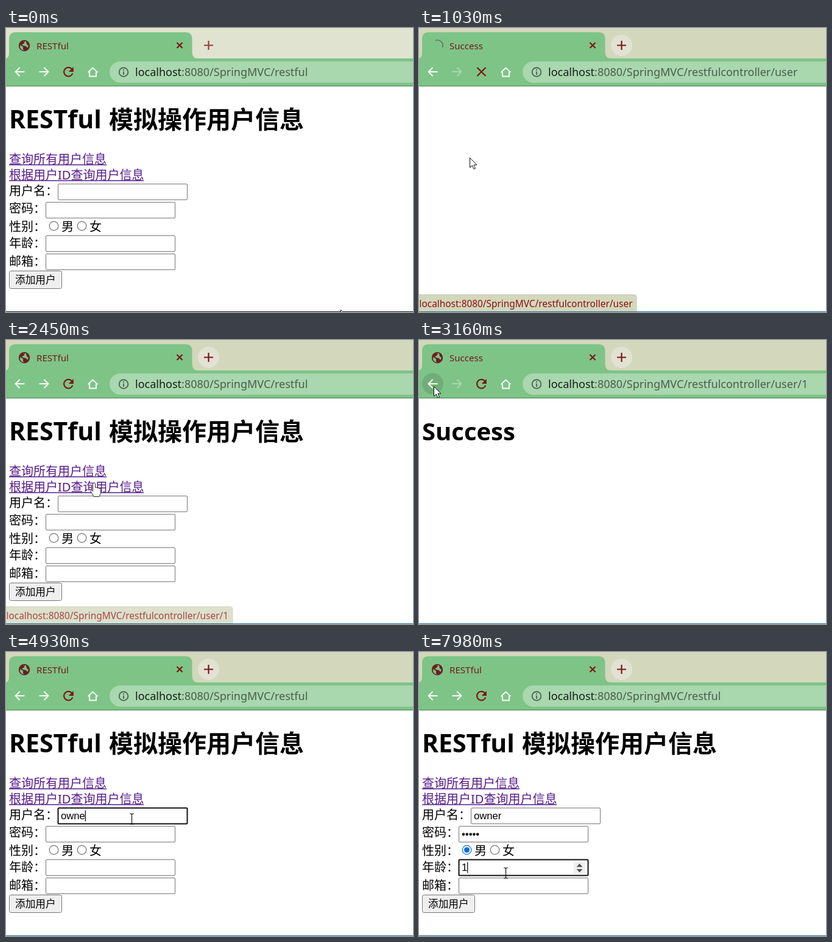
An HTML page for the animation above (8000 ms loop, 668 by 467 pixels).

```html
<!DOCTYPE html>
<html lang="zh-CN">
<head>
<meta charset="utf-8">
<title>RESTful</title>
<style>
  html, body { margin: 0; width: 100%; height: 100%; overflow: hidden; background: #fff; }
  svg { display: block; font-family: 'Noto Sans', 'Noto Sans CJK SC', 'Noto Sans CJK', sans-serif; }
  text { white-space: pre; }
  .line { fill: none; stroke-width: 1.9; }
  .white { stroke: #fbfff8; }
  .red { stroke: #7d1416; stroke-width: 2.2; }
  .tab { font-size: 15.1px; fill: #761a1c; }
  .url { font-size: 18px; fill: #4a5e4e; }
  .status { font-size: 15.4px; fill: #8e0d0f; }
  .head { font-size: 40px; font-weight: 700; }
  .body { font-size: 20px; font-weight: 350; }
  .link { fill: #551a8b; }
  .link + path { stroke: #551a8b; stroke-width: 1.4; }
  .field { fill: #fff; stroke: #767676; }
  .field.focus { stroke: #101010; stroke-width: 2; }
  .typed { font: 16.67px 'Liberation Sans', sans-serif; }
  .radio { fill: #fff; stroke: #767676; stroke-width: 1.2; }
  #spin { transform-origin: 30px 29px; }
</style>
</head>
<body>
<svg width="668" height="467" viewBox="0 0 668 467">
  <rect width="668" height="467" fill="#fff"/>

  <rect id="strip" width="668" height="51"/>
  <path d="M0 50Q5 49 5 41V18Q5 7 16 7H294.500Q305.500 7 305.500 18V40Q305.500 50 315.500 50H668V95H0Z" fill="#7ec487"/>
  <path d="M0 95.500H668" stroke="#47804f"/>
  <g id="globe">
    <circle cx="30" cy="29" r="9.200" fill="#6b1d20"/>
    <path d="M23 28L28 31V35L30 37Q22 36 23 28ZM28 22L31 23L29 26L26 27L28 29L33 30L35 33L37 29L34 27L33 22Z" fill="#7ec487"/>
  </g>
  <path id="spin" class="line" d="M27 20.500A9 9 0 0 1 38.500 32" stroke="#667d69"/>
  <text class="tab" id="title" x="50" y="35"></text>
  <path class="line red" d="M280.500 24L289.500 33M289.500 24L280.500 33"/>
  <circle id="plusDisc" cx="332.500" cy="28.500" r="17.500" fill="#e1e2d2"/>
  <path id="plus" class="line red" d="M325 28.500H340M332.500 21V36"/>

  <circle id="hover" cx="22.500" cy="72" r="17.500" fill="#70ad78"/>
  <path class="line white" d="M30.500 72H16M22.500 65L15.500 72L22.500 79"/>
  <path id="forward" class="line white" d="M54.500 72H69M62.500 65L69.500 72L62.500 79"/>
  <g id="reload">
    <path class="line red" d="M108 67.500A7.300 7.300 0 1 0 109.300 74.500"/>
    <path d="M110.800 64V72H102.800Z" fill="#7d1416"/>
  </g>
  <path id="stop" class="line red" d="M95.500 65L109.500 79M109.500 65L95.500 79"/>
  <path class="line white" d="M134.500 73L142.500 65.500L150.500 73M137 71V79.500H148V71"/>
  <path d="M668 55H187.500A17.500 17.500 0 0 0 187.500 90H668Z" fill="#a9d7ae"/>
  <circle class="line" cx="193" cy="72.500" r="7.300" stroke="#526457"/>
  <path class="line" d="M193 71.500V77M193 68V70" stroke="#526457"/>
  <text class="url" x="212" y="79"><tspan fill="#17201a">localhost</tspan><tspan id="path"></tspan></text>

  <text class="head" id="success" x="5" y="165">Success</text>
  <g id="form">
    <text class="head" x="5" y="165" style="font-size:41px">RESTful</text>
    <text class="head" x="169" y="165">模拟操作用户信息</text>
    <text class="body link" x="5" y="223">查询所有用户信息</text><path d="M5 225H165"/>
    <text class="body link" x="5" y="249">根据用户ID查询用户信息</text><path d="M5 251H226"/>
    <g id="rows"></g>
    <circle class="radio" id="male" cx="78.500" cy="325.500" r="7.300"/>
    <circle id="dot" cx="78.500" cy="325.500" r="4.500" fill="#0b6fde"/>
    <circle class="radio" cx="124.500" cy="325.500" r="7.300"/>
    <text class="body" x="5" y="334">性别：</text>
    <text class="body" x="91" y="334">男</text>
    <text class="body" x="137" y="334">女</text>
    <rect x="5.500" y="399.500" width="86" height="29" rx="3" fill="#efefef" stroke="#767676"/>
    <text x="15" y="420" font-size="16.670" font-weight="350">添加用户</text>
    <g id="stepper">
      <rect x="254" y="345" width="19" height="20" fill="#efefef"/>
      <path d="M258.500 353.500L263.500 348L268.500 353.500ZM258.500 357L263.500 362.500L268.500 357Z" fill="#505050"/>
    </g>
    <path id="caret" d="M0 -9V9" stroke="#000" stroke-width="1.200"/>
  </g>

  <g id="status">
    <path id="bubble" fill="#d3d7bc" stroke="#c8ccb2"/>
    <text class="status" id="statusText" x="0.500" y="459"></text>
  </g>
  <path id="edge" d="M0 466.500H668"/>

  <g id="cursor" stroke-linejoin="round">
    <path id="arrow" d="M0 0V16L3.800 12.500L6.500 18.500L9 17.400L6.400 11.600H11.500Z" fill="#fff" stroke="#111"/>
    <path id="hand" d="M-2 13V1.500Q0 -1 2 1.500V8Q4 6.500 5.500 9Q7.500 7.500 9 10Q11 9.500 11 12V17Q10 20 8.500 23H-0.500Q-2 19 -6 14Q-5.500 11 -2 14Z" fill="#fff" stroke="#3c1c22"/>
    <path id="beam" d="M-3.500 -8.500H-1L0 -7.500L1 -8.500H3.500M0 -7.500V7.500M-3.500 8.500H-1L0 7.500L1 8.500H3.500" fill="none" stroke="#111" stroke-width="1.200"/>
  </g>
</svg>
<script>
const LOOP = 8000;
const $ = id => document.getElementById(id);
const show = (id, on) => { $(id).style.display = on ? '' : 'none'; };
const step = (steps, t) => steps.filter(s => s[0] <= t).pop();
const latest = (steps, t) => step(steps, t)[1];
const count = (times, t) => times.filter(s => s <= t).length;

const fieldW = 213, fieldH = 27;
const fields = [
  { label: '用户名：', x: 85, y: 256, base: 275 },
  { label: '密码：', x: 65, y: 286, base: 304 },
  { label: '年龄：', x: 65, y: 341, base: 361 },
  { label: '邮箱：', x: 65, y: 371, base: 391 }
];
$('rows').innerHTML = fields.map(f => `
  <text class="body" x="5" y="${f.base}">${f.label}</text>
  <rect class="field" x="${f.x + .5}" y="${f.y + .5}" width="${fieldW - 1}" height="${fieldH - 1}" rx="1.5"/>
  <text class="typed" x="${f.x + 5}" y="${f.y + 19}"></text>`).join('');
const boxes = [...document.querySelectorAll('.field')];
const inputs = [...document.querySelectorAll('.typed')];

const user = 'owner';
const userKeys = [4400, 4600, 4700, 4820, 4940];
const passKeys = [5330, 5410, 5490, 5570, 5650];
const ageKeys = [7600];

const pages = [[0, 'form'], [890, 'load'], [1110, 'done'], [1700, 'form'],
  [2520, 'load'], [2740, 'done'], [3360, 'form']];
const routes = [[0, 'restful'], [890, 'restfulcontroller/user'], [1700, 'restful'],
  [2520, 'restfulcontroller/user/1'], [3360, 'restful']];
const hints = [[0, ''], [680, 'user'], [1240, ''], [2260, 'user/1'], [2940, '']];
const hovers = [[0, false], [1450, true], [1900, false], [3080, true], [4050, false]];
const focuses = [[0, -1], [4050, 0], [5060, 1], [6430, -1], [7110, 2]];
const moves = [[0, 549, 463], [70, 540, 452], [750, 83, 213], [1090, 83, 213], [1500, 24, 76],
  [1750, 24, 76], [2350, 144, 234], [2660, 144, 234], [3120, 24, 76], [3400, 24, 76],
  [3770, 206, 274], [5680, 206, 274], [6170, 86, 329], [6470, 86, 329], [6750, 118, 402],
  [6900, 118, 402], [7110, 146, 360], [7310, 149, 362], [7710, 146, 359], [7980, 142, 363]];

function pointer(t) {
  const i = moves.findIndex(m => m[0] > t);
  if (i < 0) return moves[moves.length - 1].slice(1);
  const [t0, x0, y0] = moves[i - 1], [t1, x1, y1] = moves[i];
  const k = (t - t0) / (t1 - t0), e = k * k * (3 - 2 * k);
  return [x0 + (x1 - x0) * e, y0 + (y1 - y0) * e];
}

function shapeAt(x, y, page) {
  if (page !== 'form') return 'arrow';
  if (y > 205 && y < 253 && x > 5 && x < (y < 229 ? 165 : 226)) return 'hand';
  const inField = fields.some(f => x > f.x && x < f.x + fieldW && y > f.y && y < f.y + fieldH);
  return inField ? 'beam' : 'arrow';
}

function render(t) {
  const page = latest(pages, t), loading = page === 'load', form = page === 'form';
  const active = t >= 70;
  $('strip').setAttribute('fill', active ? '#d3d7bc' : '#dfe3d0');
  $('edge').setAttribute('stroke', active ? '#1f6c9e' : '#111');
  $('plus').setAttribute('opacity', active ? 1 : .8);
  show('plusDisc', active);

  show('globe', !loading);
  show('spin', loading);
  $('spin').style.transform = `rotate(${(t - 1030) * .36}deg)`;
  show('reload', !loading);
  show('stop', loading);
  show('form', form);
  show('success', page === 'done');
  show('hover', latest(hovers, t));
  $('forward').setAttribute('opacity', form ? 1 : .35);
  $('title').textContent = form ? 'RESTful' : 'Success';
  $('path').textContent = ':8080/SpringMVC/' + latest(routes, t);

  const [since, hint] = step(hints, t);
  show('status', hint);
  $('status').setAttribute('opacity', Math.min(1, (t - since) / 250));
  $('statusText').textContent = 'localhost:8080/SpringMVC/restfulcontroller/' + hint;
  const right = hint === 'user' ? 357 : 372;
  $('bubble').setAttribute('d', `M-1 438.5H${right - 4}Q${right} 438.5 ${right} 442.5V468H-1Z`);

  inputs[0].textContent = user.slice(0, count(userKeys, t));
  inputs[1].textContent = '•'.repeat(count(passKeys, t));
  inputs[2].textContent = '1'.repeat(count(ageKeys, t));
  const focus = latest(focuses, t);
  boxes.forEach((b, i) => b.classList.toggle('focus', i === focus));
  show('stepper', focus === 2);
  show('caret', focus >= 0);
  if (focus >= 0) {
    const f = fields[focus], text = inputs[focus];
    const w = text.textContent ? text.getComputedTextLength() : 0;
    $('caret').setAttribute('transform', `translate(${f.x + 5.5 + w} ${f.y + fieldH / 2})`);
  }
  const checked = t >= 6430;
  show('dot', checked);
  $('male').style.stroke = checked ? '#0b6fde' : '';

  const [x, y] = pointer(t), shape = shapeAt(x, y, page);
  ['arrow', 'hand', 'beam'].forEach(s => show(s, s === shape));
  $('cursor').setAttribute('transform', `translate(${Math.round(x) + .5} ${Math.round(y) + .5})`);
}

const start = performance.now();
function tick() {
  render((performance.now() - start) % LOOP);
  requestAnimationFrame(tick);
}
tick();
</script>
</body>
</html>
```
